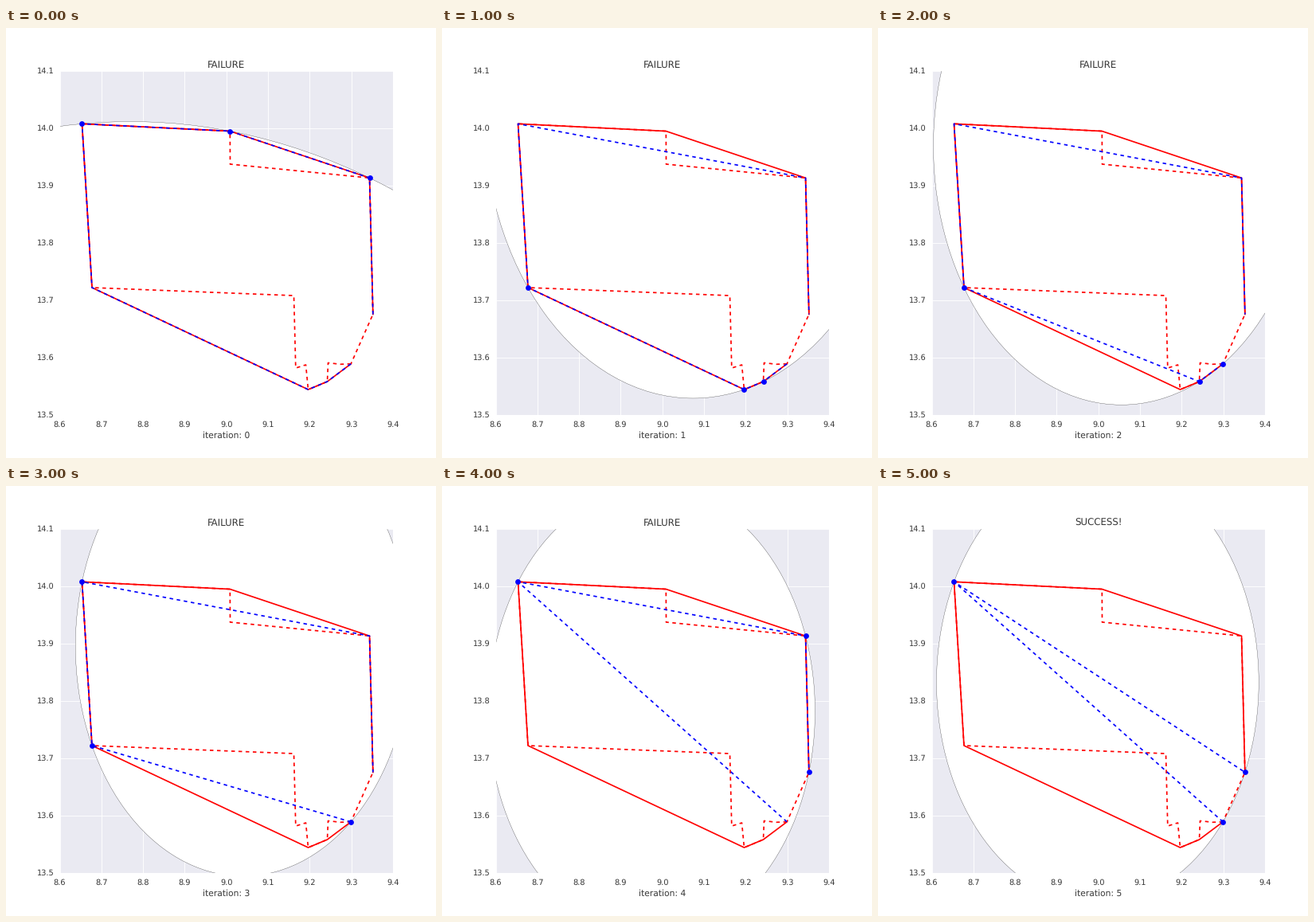
These frames come from a looping animation (540 px wide and 540 px high, 6 s). A matplotlib script:

```python
import numpy as np
import matplotlib.pyplot as plt
from matplotlib.animation import FuncAnimation

INK = "0.22"
plt.rcParams.update({
    "font.family": "DejaVu Sans",
    "font.size": 13,
    "text.color": INK,
    "text.hinting": "none",
    "lines.scale_dashes": False,
    "lines.linewidth": 2.275,
    "axes.axisbelow": True,
    "ytick.alignment": "center",
})

HULL = {
    "E": (9.2990, 13.5892), "F": (9.2423, 13.5583), "G": (9.1964, 13.5444),
    "H": (8.6774, 13.7222), "A": (8.6535, 14.0079), "B": (9.0087, 13.9951),
    "C": (9.3437, 13.9135), "D": (9.3519, 13.6757),
}
# notches of the polygon, each following the named hull corner
NOTCHES = {
    "E": [(9.2738, 13.5885), (9.2442, 13.5910)],
    "G": [(9.1907, 13.5875), (9.1664, 13.5819), (9.1620, 13.7083)],
    "B": [(9.0091, 13.9375)],
}
# middle corner tested at each step; it is dropped when the test fails
TESTED = "BGFHCD"


def outline():
    pts = []
    for name, p in HULL.items():
        pts += [p] + NOTCHES.get(name, [])
    return pts + [HULL["E"]]


def circumcircle(a, b, c):
    u, v = b - a, c - a
    off = np.linalg.solve(2 * np.array([u, v]), [u @ u, v @ v])
    return a + off, np.hypot(*off)


def state(i):
    names = [n for n in HULL if n not in TESTED[:i]]
    k = names.index(TESTED[i])
    trio = [names[(k + d) % len(names)] for d in (-1, 0, 1)]
    return [np.array([HULL[n] for n in group]) for group in (names, trio)]


fig = plt.figure(figsize=(10, 10), dpi=54, facecolor="white")
ax = fig.add_axes([0.125, 0.1, 0.775, 0.8], facecolor="#EAEAF2")
ax.set(xlim=(8.6, 9.4), ylim=(13.5, 14.1))
ax.set_xticks(np.linspace(8.6, 9.4, 9))
ax.set_yticks(np.linspace(13.5, 14.1, 7))
ax.xaxis.set_major_formatter("{x:.1f}")
ax.yaxis.set_major_formatter("{x:.1f}")
ax.tick_params(length=0, pad=9.1, labelcolor=INK)
ax.grid(color="white", lw=1.15, ls="-")
for spine in ax.spines.values():
    spine.set_visible(False)

circle = plt.Circle((9, 13.8), 0.4, fc="white", ec="0.15", lw=0.39)
ax.add_patch(circle)
DASH = (0, (6, 6))
ax.plot(*zip(*outline()), color="red", ls=DASH)
ax.plot(*zip(*HULL.values()), color="red")
chain, = ax.plot([], [], color="blue", ls=DASH)
dots, = ax.plot([], [], "o", color="blue", ms=9.1, mew=0)
title = fig.text(0.5125, 490 / 540, "", size=15.6, ha="center")
label = fig.text(0.5125, 25 / 540, "", size=14.3, ha="center")


def draw(i):
    path, trio = state(i)
    circle.center, circle.radius = circumcircle(*trio)
    chain.set_data(*path.T)
    dots.set_data(*trio.T)
    title.set_text("SUCCESS!" if i == len(TESTED) - 1 else "FAILURE")
    label.set_text(f"iteration: {i}")
    return circle, chain, dots, title, label


anim = FuncAnimation(fig, draw, frames=len(TESTED), interval=1000,
                     init_func=lambda: draw(0), repeat=True, repeat_delay=0)
plt.show()
```
